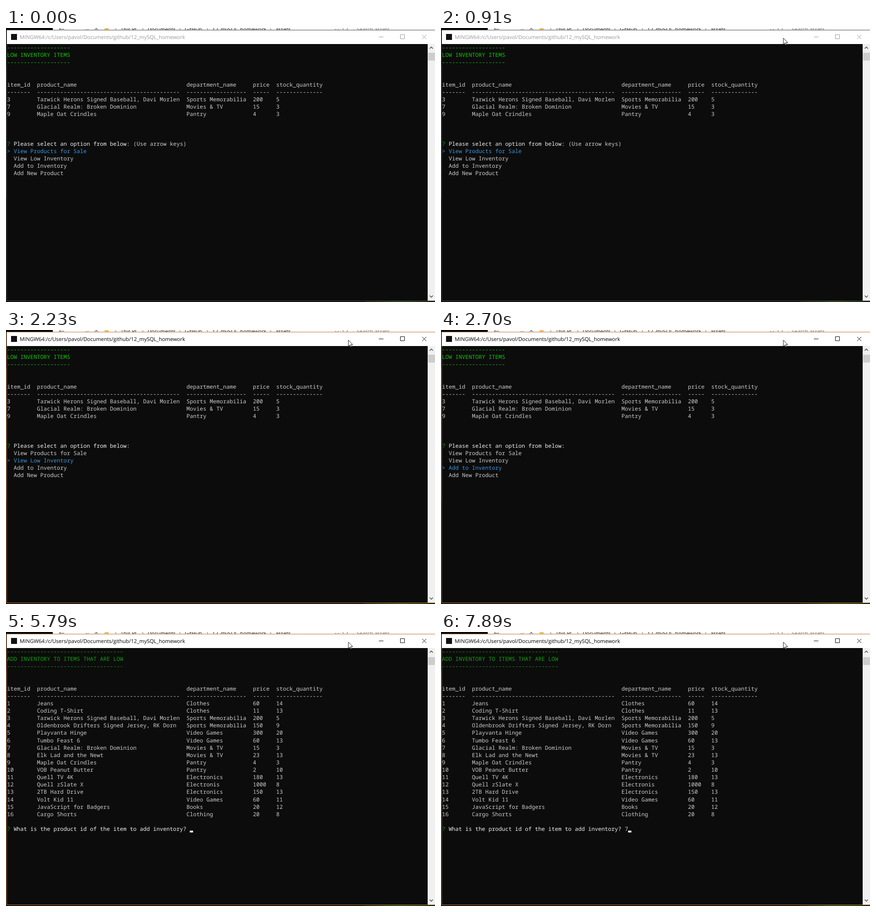
These frames come from a looping animation (936 by 598 pixels, 8 s). An HTML page:

```html
<!DOCTYPE html>
<html lang="en">
<head>
<meta charset="utf-8">
<title>Inventory terminal</title>
<style>
  html, body { margin: 0; width: 100%; height: 100%; overflow: hidden; background: #0c0c0c; }
  svg { display: block; width: 936px; height: 598px; }
  text { white-space: pre; text-rendering: geometricPrecision; }
  .ui { font: 11.45px "Open Sans", "Noto Sans", sans-serif; }
  .term { font: 12.083px "Noto Sans Mono", "DejaVu Sans Mono", monospace; }
  .line { fill: none; stroke-width: 1; }
</style>
</head>
<body>
<svg viewBox="0 0 936 598" xmlns="http://www.w3.org/2000/svg">
  <defs>
    <linearGradient id="grass">
      <stop offset="0" stop-color="#0f1a08"/>
      <stop offset=".5" stop-color="#2b4414"/>
      <stop offset="1" stop-color="#16240b"/>
    </linearGradient>
  </defs>

  <!-- Window behind -->
  <rect width="936" height="598" fill="#0a0a0a"/>
  <rect x="102" width="834" height="5" fill="#fff"/>
  <g id="crumbs" class="ui" fill="#222"></g>
  <rect x="215" width="9" height="5" fill="#f5c26b"/>
  <g class="line" stroke="#555">
    <path d="M119 0L116 2.5L119 5M116 2.5H127M174 2L177 5L180 2M197 0V5M193 4L197 0L201 4"/>
    <path d="M718 2L722 5.5L726 2M735 0Q735 5 740 5T745 0"/>
    <path d="M730.5 0V5M757.5 0V5" stroke="#d9d9d9"/>
  </g>
  <rect y="83" width="2" height="288" fill="#2c2c2c"/>
  <rect x="782" y="595" width="154" height="3" fill="url(#grass)"/>

  <!-- Terminal window -->
  <rect x="2" y="5" width="934" height="30" fill="#fff"/>
  <rect x="2" y="35" width="918" height="560" fill="#0c0c0c"/>
  <rect x="920" y="35" width="16" height="560" fill="#f0f0f0"/>
  <rect id="thumb" x="921" width="15" height="17" fill="#cdcdcd"/>
  <path class="line" stroke="#505050" style="stroke-width:1.6" d="M924.5 45L928 41.5L931.5 45M924.5 584L928 587.5L931.5 584"/>
  <path id="frame" class="line" d="M936 4.5H1.5V595.5H936"/>
  <rect x="11" y="13" width="13" height="13" fill="#111"/>
  <text id="title" class="ui" x="30" y="24">MINGW64:/c/Users/pavol/Documents/github/12_mySQL_homework</text>
  <path id="controls" class="line" d="M813.5 19.5H823.5M860.5 14.5H869.5V23.5H860.5ZM908 15L917 24M917 15L908 24"/>

  <g id="screen" class="term"></g>
  <rect id="caret" y="433.5" width="7.2" height="4" fill="#f2f2f2"/>
  <circle id="click" cx="747" cy="22" r="12" fill="#ff0" fill-opacity=".47"/>
  <path id="pointer" d="M0 0V13.5L3 10.7L5 15.3L7 14.4L5 10H9.5Z" fill="#fff" stroke="#000" stroke-width=".9"/>
</svg>
<script>
const LOOP = 8000;
const CELL = 7.25, ROW = 16.13, LEFT = 2.2, BASE = 47;
const GRAY = '#cccccc', WHITE = '#f2f2f2', GREEN = '#13a10e', LIME = '#16c60c', BLUE = '#3a96dd';
const COLUMNS = [0, 9, 54, 74, 81];
const HEADERS = ['item_id', 'product_name', 'department_name', 'price', 'stock_quantity'];
const RULES = [7, 43, 18, 5, 14];
const OPTIONS = ['View Products for Sale', 'View Low Inventory', 'Add to Inventory', 'Add New Product'];

const PRODUCTS = `Jeans|Clothes|60|14
Coding T-Shirt|Clothes|11|13
Tarwick Herons Signed Baseball, Davi Morlen|Sports Memorabilia|200|5
Oldenbrook Drifters Signed Jersey, RK Dorn|Sports Memorabilia|150|9
Playvanta Hinge|Video Games|300|20
Tumbo Feast 6|Video Games|60|13
Glacial Realm: Broken Dominion|Movies & TV|15|3
Elk Lad and the Newt|Movies & TV|23|13
Maple Oat Crindles|Pantry|4|3
VOB Peanut Butter|Pantry|2|10
Quell TV 4K|Electronics|180|13
Quell zSlate X|Electronis|1000|8
2TB Hard Drive|Electronics|150|13
Volt Kid 11|Video Games|60|11
JavaScript for Badgers|Books|20|12
Cargo Shorts|Clothing|20|8`.split('\n').map((row, i) => [String(i + 1), ...row.split('|')]);
const LOW_STOCK = PRODUCTS.filter(p => +p[4] <= 5);

// Pointer stops: [start ms, x, y]; null hides it.
const POINTER = [
  [0, null], [200, 775, 229], [280, 769, 142], [360, null],
  [520, 766, 139], [600, 758, 104], [680, 749, 66], [750, 743, 38], [830, 744, 26], [910, 747, 22]
];
// The text caret toggles at each of these times, starting visible.
const BLINKS = [3930, 4260, 4780, 5330, 5790, 6340, 6890, 7430, 7890];

const $ = id => document.getElementById(id);
const escape = s => s.replace(/&/g, '&amp;').replace(/</g, '&lt;').replace(/>/g, '&gt;');
const show = (el, on) => el.setAttribute('visibility', on ? 'visible' : 'hidden');
const cellX = col => LEFT + col * CELL;

function put(col, row, str, color = GRAY) {
  const y = (BASE + row * ROW).toFixed(2);
  return `<text x="${cellX(col)}" y="${y}" fill="${color}">${escape(str)}</text>`;
}

function heading(label, color) {
  const rule = '-'.repeat(label.length);
  return [rule, label, rule].map((s, i) => put(0, i, s, color)).join('');
}

function table(items) {
  const rows = [HEADERS, RULES.map(n => '-'.repeat(n)), ...items];
  return rows.map((cells, r) => cells.map((s, c) => put(COLUMNS[c], 5 + r, s)).join('')).join('');
}

function prompt(row, question) {
  return put(0, row, '?', GREEN) + put(2, row, question, WHITE);
}

function menuScreen(selected) {
  const options = OPTIONS.map((name, i) => i === selected
    ? put(0, 14 + i, '> ' + name, BLUE)
    : put(2, 14 + i, name));
  return heading('LOW INVENTORY ITEMS', LIME) + table(LOW_STOCK) +
    prompt(13, 'Please select an option from below:') +
    (selected === 0 ? put(38, 13, '(Use arrow keys)') : '') + options.join('');
}

function addScreen(answer) {
  return heading('ADD INVENTORY TO ITEMS THAT ARE LOW', GREEN) + table(PRODUCTS) +
    prompt(24, 'What is the product id of the item to add inventory?') + put(55, 24, answer);
}

$('crumbs').innerHTML = [
  [250, 'This PC'], [309, 'Documents'], [390, 'GitHub'], [450, '12_mySQL_homework'], [588, 'assets'],
  [765, 'Search assets', '#777']
].map(([x, s, color = '#222']) => `<text x="${x}" y="6.5" fill="${color}">${s}</text>` +
  (x < 700 ? `<path class="line" stroke="#555" d="M${x - 13} -1L${x - 9.5} 2.5L${x - 13} 6"/>` : '')).join('');

let drawn = '';
function drawScreen(t) {
  const adding = t >= 3930;
  const answer = t >= 6890 ? '7' : '';
  const selected = t < 2230 ? 0 : t < 2700 ? 1 : 2;
  const key = adding ? 'add' + answer : 'menu' + selected;
  if (key !== drawn) {
    $('screen').innerHTML = adding ? addScreen(answer) : menuScreen(selected);
    drawn = key;
  }
  $('thumb').setAttribute('y', adding ? 55 : 54);
  $('caret').setAttribute('x', cellX(55 + answer.length));
  show($('caret'), BLINKS.filter(time => time <= t).length % 2 === 1);
}

function drawWindow(t) {
  const active = t >= 1080;
  $('title').setAttribute('fill', active ? '#000' : '#999');
  $('controls').setAttribute('stroke', active ? '#000' : '#999');
  $('frame').setAttribute('stroke', active ? '#b9713f' : '#484848');
}

function drawPointer(t) {
  const [, x, y] = POINTER.filter(stop => stop[0] <= t).pop();
  show($('pointer'), x !== null);
  if (x !== null) $('pointer').setAttribute('transform', `translate(${x} ${y})`);
  show($('click'), t >= 1080 && t < 1300);
}

function render(t) {
  drawWindow(t);
  drawScreen(t);
  drawPointer(t);
}

function tick() {
  render(performance.now() % LOOP);
  requestAnimationFrame(tick);
}
tick();
</script>
</body>
</html>
```
